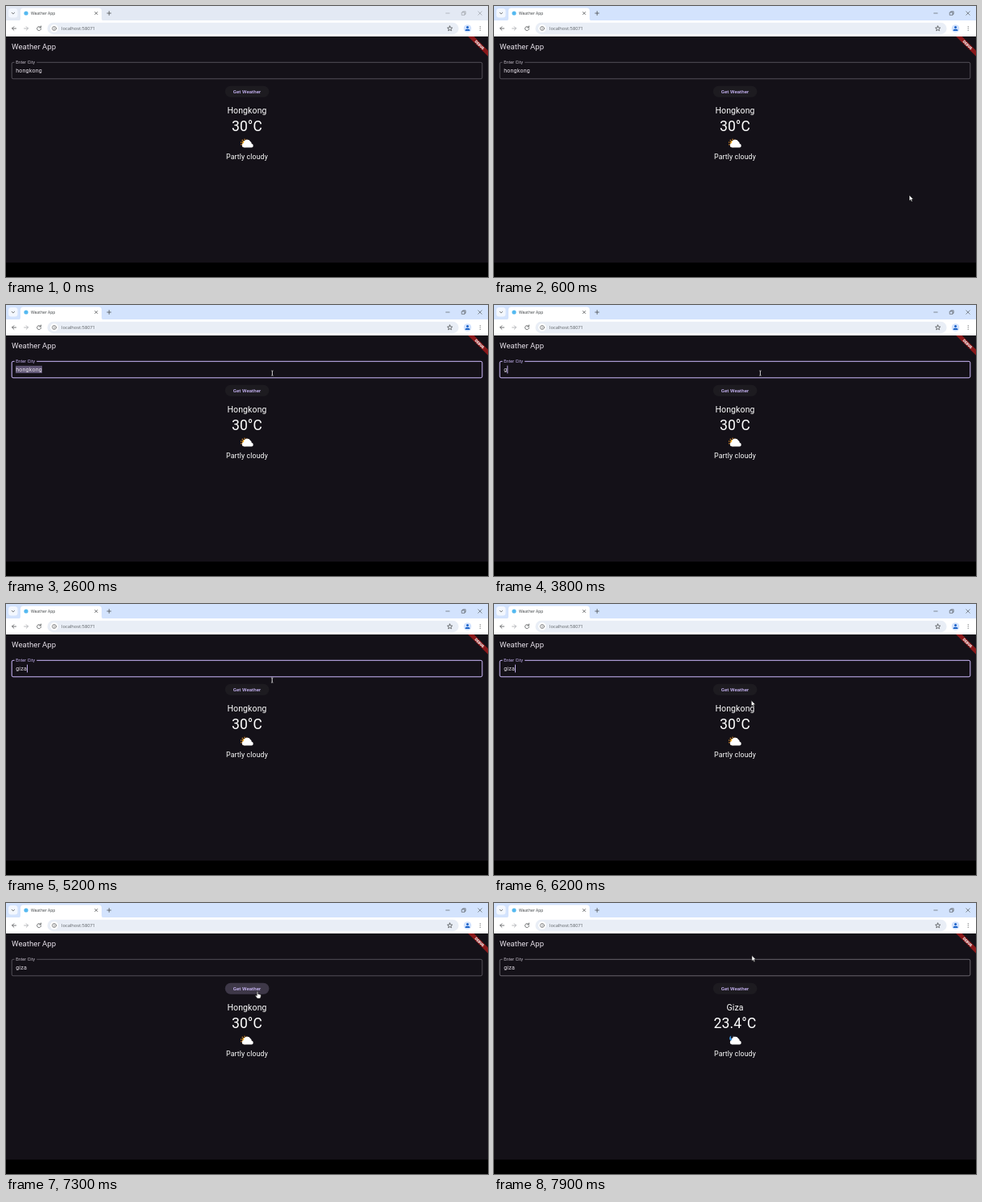
An HTML page for the animation above (8 s loop, 600 px wide and 338 px high).

```html
<!DOCTYPE html>
<html>
<head>
<meta charset="utf-8">
<title>Weather App</title>
<style>
  html, body { margin: 0; width: 100%; height: 100%; overflow: hidden; background: #000; }
  svg { display: block; width: 600px; height: 338px; }
  text { font-family: Roboto, sans-serif; fill: #e6e0e9; white-space: pre; }
  .chrome text { font-family: "Open Sans", sans-serif; fill: #3c4043; }
  .line { fill: none; stroke: #454749; stroke-width: .75; stroke-linecap: round; stroke-linejoin: round; }
  .result text { text-anchor: middle; letter-spacing: .11px; fill: #fff; }
  .pointer { fill: #fff; stroke: #111; stroke-width: .5; stroke-linejoin: round; }
</style>
</head>
<body>
<svg viewBox="0 0 600 338">
  <defs>
    <clipPath id="page"><rect y="38" width="600" height="282"/></clipPath>
  </defs>

  <g class="chrome">
    <rect id="strip" width="600" height="20"/>
    <rect x="3" y="3" width="11.5" height="11.5" rx="3.5" fill="#f3f7fe"/>
    <path class="line" d="M7.2 8.2l1.7 1.7 1.7-1.7"/>
    <path fill="#fff" d="M15 18.5q3 0 3-3V6q0-3.500 3.500-3.500H115.500q3.500 0 3.500 3.500V15.500q0 3 3 3z"/>
    <rect y="18" width="600" height="20.200" fill="#fff"/>
    <circle cx="25" cy="9" r="2.600" fill="#54b9f0"/>
    <text x="31" y="10.900" font-size="5">Weather App</text>
    <path class="line" d="M110.700 7.400l3.200 3.200m0-3.200l-3.200 3.200M128.300 6.600v4.800m-2.400-2.400h4.800"/>
    <path id="controls" class="line" style="stroke-width:.6" d="M547.600 9h4.400M567.600 7.900h3.400v3.400h-3.400zM568.700 7.700v-.9h3.400v3.400h-.9M587.800 6.800l4.400 4.400m0-4.400l-4.400 4.400"/>
    <path class="line" d="M12.500 28H7.700m2.200-2.300L7.600 28l2.300 2.300"/>
    <path class="line" style="stroke:#a0a3a7" d="M22.600 28h4.800m-2.200-2.300l2.300 2.300-2.300 2.300"/>
    <path class="line" d="M43 26.500a2.500 2.500 0 1 0 .6 2M43.600 25v1.900h-1.900"/>
    <rect x="51.500" y="20.800" width="512" height="14.400" rx="7.200" fill="#e9eef6"/>
    <circle cx="60" cy="28" r="4.800" fill="#fff"/>
    <circle class="line" cx="60" cy="28" r="2.500" style="stroke-width:.6"/>
    <path class="line" style="stroke-width:.6" d="M60 27.900v1.300M60 26.700v.05"/>
    <text x="69" y="30" font-size="5.750" style="fill:#5b6065">localhost:58071</text>
    <path class="line" d="M552.500 25l.9 2 2.200.2-1.700 1.400.5 2.200-1.900-1.100-1.900 1.100.5-2.200-1.700-1.400 2.200-.2z"/>
    <circle cx="574.500" cy="28" r="4.800" fill="#d3e3fd"/>
    <circle cx="574.500" cy="26.600" r="1.500" fill="#1a62c8"/>
    <path fill="#1a62c8" d="M571.500 31q0-2.200 3-2.200t3 2.200z"/>
    <path class="line" style="stroke-width:1.150" d="M590.200 25.800v.01M590.200 28v.01M590.200 30.200v.01"/>
  </g>

  <g clip-path="url(#page)">
    <rect y="38" width="600" height="282" fill="#141118"/>
    <text x="7" y="53.500" font-size="9.660">Weather App</text>
    <g transform="translate(600 38) rotate(45)">
      <rect x="-17.600" y="12.300" width="35.200" height="5.270" fill="#b71c1c" opacity=".72"/>
      <text y="16.500" font-size="4.480" font-weight="900" text-anchor="middle" style="fill:#fff">DEBUG</text>
    </g>

    <rect id="border" x="7.200" y="70.300" width="585.600" height="20.500" rx="1.750" fill="none"/>
    <rect x="10.600" y="69" width="27.600" height="2.600" fill="#141118"/>
    <text id="label" x="12.200" y="72" font-size="5.270" letter-spacing=".160">Enter City</text>
    <rect id="selection" x="12" y="75.800" height="9.200" fill="#d0bcff" opacity=".4"/>
    <text id="entry" x="12.200" y="82.700" font-size="7.030" letter-spacing=".220"></text>
    <rect id="caret" y="75.600" width=".9" height="9.800" fill="#d0bcff"/>

    <rect x="272.700" y="99.700" width="54.800" height="14" rx="7" fill="#1d1b20"/>
    <rect id="glow" x="272.700" y="99.700" width="54.800" height="14" rx="7" fill="#d0bcff"/>
    <text x="300" y="109" font-size="6.150" font-weight="500" letter-spacing=".044" text-anchor="middle" style="fill:#d0bcff">Get Weather</text>

    <g class="result">
      <text id="city" x="300" y="133.800" font-size="10.540"></text>
      <text id="degrees" x="300" y="156.300" font-size="17.560"></text>
      <g id="sun">
        <circle cx="297.300" cy="171" r="4.700" fill="none" stroke="#f09a2c" stroke-width="1.300" stroke-dasharray="1.300 1.660"/>
        <circle cx="297.300" cy="171" r="3.200" fill="#f8b133"/>
      </g>
      <g id="moon">
        <path fill="#3b8fd8" d="M295.200 165.400a3.600 3.600 0 1 0 4.500 5.200 3.900 3.900 0 0 1-4.500-5.200z"/>
        <path fill="none" stroke="#a9d5f7" stroke-linecap="round" stroke-width=".9" d="M298 166.300v.01M300 168v.01"/>
      </g>
      <path fill="#fff" d="M296.200 176.600a2.800 2.800 0 0 1-.3-5.500 4.400 4.400 0 0 1 8.300-2 3.700 3.700 0 0 1 1.600 2.600 2.500 2.500 0 0 1-.1 4.900z"/>
      <text x="300" y="191" font-size="8.780">Partly cloudy</text>
    </g>
  </g>

  <g id="cursor">
    <path id="arrow" class="pointer" d="M0 0V7l1.600-1.400 1.100 2.500 1.200-.5-1.100-2.500H5z"/>
    <path id="beam" fill="none" stroke="#e8e8e8" stroke-width=".6" d="M-1.300-3h1q.3 0 .3.300V2.700q0 .3.300.3h1M1.300-3h-1q-.3 0-.3.300V2.700q0 .3-.3.300h-1"/>
    <path id="hand" class="pointer" d="M-.7.500q.7-.9 1.400 0V3.300l3 .7q.8.300.7 1.200L4 7.200 3.400 8.800H-.2L-2.400 5.700q-.3-1.100.8-.8l.9.800z"/>
  </g>
</svg>
<script>
const LOOP = 8000, STEP = 100;
const el = id => document.getElementById(id);
const ramp = (t, start, length) => Math.min(1, Math.max(0, (t - start) / length));
const within = (t, a, b) => t >= a && t < b;
const show = (id, on) => el(id).setAttribute("visibility", on ? "visible" : "hidden");
const set = (id, attrs) => { for (const k in attrs) el(id).setAttribute(k, attrs[k]); };
const mix = (a, b, k) => `rgb(${a.map((v, i) => Math.round(v + (b[i] - v) * k))})`;

const OUTLINE = [147, 143, 153], BRIGHT = [230, 224, 233], MUTED = [202, 196, 208], ACCENT = [208, 188, 255];

// time, x, y
const route = [
  [300, 548, 212], [600, 517, 236], [700, 470, 222], [1000, 283, 163], [1100, 300, 148],
  [1300, 337, 101], [1500, 337, 101], [1600, 333, 92], [1700, 333, 92], [1800, 331, 87.5],
  [2000, 331.5, 85], [5100, 331.5, 85], [5200, 331.3, 95], [5300, 331, 107], [5500, 327, 118],
  [5600, 327, 118], [5900, 323, 119], [6000, 323, 119], [6300, 319, 121], [6800, 314, 110.5],
  [7000, 313, 110.2], [7600, 313, 110.2], [7800, 316, 104], [7900, 321, 65.5]
];
const typing = [[0, "hongkong"], [3800, "g"], [4200, "gi"], [4600, "giz"], [4900, "giza"]];

function pointAt(t) {
  const i = route.findIndex(p => p[0] > t);
  if (i < 1) return (i ? route.at(-1) : route[0]).slice(1);
  const [a, b] = [route[i - 1], route[i]], k = ramp(t, a[0], b[0] - a[0]);
  return [a[1] + (b[1] - a[1]) * k, a[2] + (b[2] - a[2]) * k];
}

function draw(t) {
  const active = t >= 200;
  set("strip", { fill: active ? "#d3e3fd" : "#e3e9f4" });
  set("controls", { opacity: active ? 1 : .5 });

  const focus = ramp(t, 2100, 200) - ramp(t, 7100, 200);
  const hover = t < 7000 ? ramp(t, 1700, 200) : ramp(t, 7850, 100);
  const rest = OUTLINE.map((v, i) => v + (BRIGHT[i] - v) * hover);
  set("border", { stroke: mix(rest, ACCENT, focus), "stroke-width": .5 + .5 * focus });
  el("label").style.fill = mix(MUTED, ACCENT, focus);

  el("entry").textContent = typing.findLast(p => t >= p[0])[1];
  const width = el("entry").getComputedTextLength();
  const selected = within(t, 2500, 3800);
  set("selection", { width: width + .2 });
  set("caret", { x: 12.2 + width });
  show("selection", selected);
  show("caret", within(t, 2200, 7200) && !selected && !within(t, 5400, 5900) && !within(t, 6400, 6800));

  const over = within(t, 6500, 7900);
  const press = ramp(t, 7000, 200) - ramp(t, 7300, 300);
  set("glow", { opacity: (over ? .08 : 0) + .1 * press });

  const loaded = t >= 7500;
  el("city").textContent = loaded ? "Giza" : "Hongkong";
  el("degrees").textContent = loaded ? "23.4°C" : "30°C";
  show("sun", !loaded);
  show("moon", loaded);

  const beam = within(t, 1900, 5300);
  set("cursor", { transform: `translate(${pointAt(t)})` });
  show("arrow", t >= 300 && !beam && !over);
  show("beam", beam);
  show("hand", over);
}

const start = performance.now();
function tick() {
  const t = (performance.now() - start) % LOOP;
  draw(Math.floor(t / STEP) * STEP);
  requestAnimationFrame(tick);
}
tick();
</script>
</body>
</html>
```
